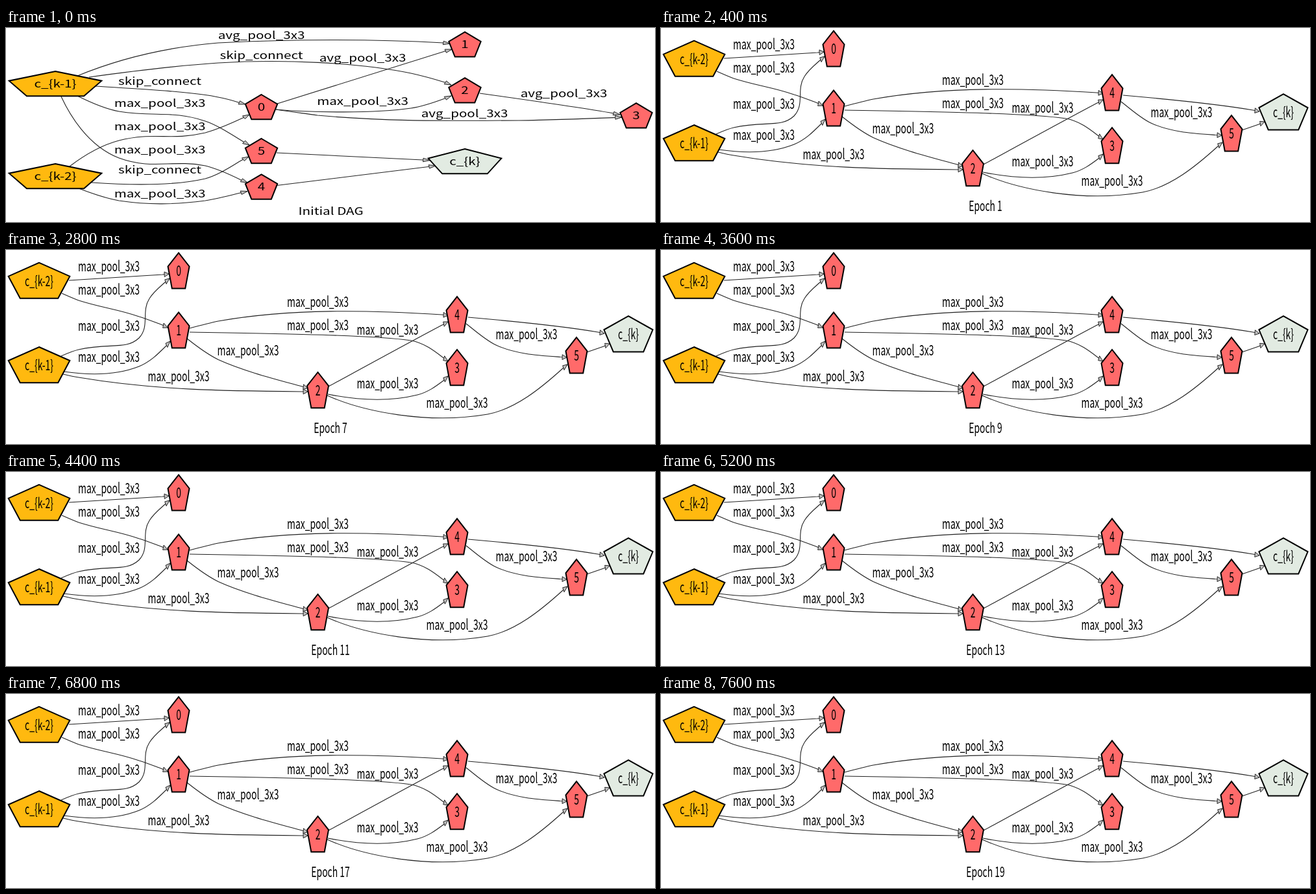
Write an HTML page that moves like this. It is 1000 px wide and 300 px high and loops after 8000 ms.

```html
<!DOCTYPE html>
<html lang="en">
<head>
<meta charset="utf-8">
<title>Cell search</title>
<style>
  html, body { margin: 0; width: 100%; height: 100%; overflow: hidden; background: #fff; }
  svg { display: block; width: 1000px; height: 300px; }
  text { font: 20px "Noto Sans CJK JP", "Noto Sans CJK SC", "Noto Sans CJK", sans-serif; text-anchor: middle; }
  .edge { fill: none; stroke: #222; stroke-width: 1.1; }
  .head { fill: #c0c0c0; stroke: #222; }
  .node { stroke: #000; stroke-width: 2; }
</style>
</head>
<body>
<svg id="stage" viewBox="0 0 1000 300"></svg>
<script>
const STEP = 400, STEPS = 20;
const GOLD = '#ffb90f', RED = '#ff6a6a', PALE = '#e2ebe2';
const MAX = 'max_pool_3x3', AVG = 'avg_pool_3x3', SKIP = 'skip_connect';

// Each graph is squeezed into the stage, so text and arrows share its x and y scale.
function graph({ sx, sy, radius, nodeBase, labelBase }) {
  const edges = [], nodes = [];
  const text = (s, x, y, id = '') =>
    `<text ${id} transform="translate(${x} ${y}) scale(${sx} ${sy})">${s}</text>`;

  function arrow(px, py, x, y) {
    const dx = (x - px) / sx, dy = (y - py) / sy, len = Math.hypot(dx, dy);
    const ux = dx / len, uy = dy / len;
    const corner = side =>
      `${x - (10 * ux + side * uy) * sx},${y - (10 * uy - side * ux) * sy}`;
    return `<polygon class="head" points="${x},${y} ${corner(3.5)} ${corner(-3.5)}"/>`;
  }

  return {
    text,
    // The path ends with a straight piece that carries the arrowhead.
    edge(d, label, x, y) {
      const end = d.match(/[\d.]+/g).slice(-4).map(Number);
      edges.push(`<path class="edge" d="${d}"/>` + arrow(...end));
      if (label) edges.push(text(label, x, y + labelBase));
    },
    node(label, x, top, half, fill) {
      const rx = half / Math.sin(Math.PI * 0.4), cy = top + 1 + radius;
      const points = [0, 1, 2, 3, 4].map(i => {
        const a = i * Math.PI * 0.4;
        return `${x + rx * Math.sin(a)},${cy - radius * Math.cos(a)}`;
      });
      nodes.push(`<polygon class="node" fill="${fill}" points="${points.join(' ')}"/>` +
        text(label, x, top + nodeBase));
    },
    markup: caption => `<g>${edges.join('')}${nodes.join('')}${caption}</g>`
  };
}

function initialGraph() {
  const g = graph({ sx: 1.03, sy: 0.8, radius: 21.2, nodeBase: 26, labelBase: 5.7 });
  g.edge('M110 74C180 45 255 29 327 23C440 17 570 17 674 23L684 24', AVG, 393.5, 11);
  g.edge('M128 76C200 66 265 58 327 54C425 48 540 53 624 70C642 74 660 79 676 84L686 88', SKIP, 393.5, 42);
  g.edge('M138 90C200 94 280 98 322 106C338 109 346 111 358 115L369 118', SKIP, 237, 82);
  g.edge('M110 105C130 115 152 125 174 129C230 138 256 127 307 144C325 150 345 163 366 176L375 181', MAX, 237, 116);
  g.edge('M85 106C97 132 125 182 174 201C226 220 256 203 307 213C327 218 344 226 362 235L372 239', MAX, 237, 188);
  g.edge('M98 214C115 201 144 182 174 174C230 160 252 175 307 162C329 156 348 147 365 139L375 134', MAX, 237, 152);
  g.edge('M132 239C190 243 260 244 307 233C328 227 345 215 364 204L374 199', SKIP, 237, 219);
  g.edge('M112 248C130 255 152 263 174 267C222 274 258 273 307 267C326 264 345 259 361 255L372 252.5', MAX, 237, 256);
  g.edge('M418 117L676 36L687 33', AVG, 549.5, 46);
  g.edge('M416 126C470 131 570 132 624 124C644 121 660 115 676 109L686 105', MAX, 549.5, 113);
  g.edge('M416 126C440 130 460 132 480 135C600 146 700 143 790 143C850 142 900 140 938 138.5L949 138', AVG, 706.5, 132);
  g.edge('M730 101C780 108 880 122 936 132L946 134', AVG, 859.5, 101);
  g.edge('M417 193L642 204L653 204.6');
  g.edge('M417 243.5L651 214.5L662 213');

  g.node('c_{k-1}', 76, 66, 71.3, GOLD);
  g.node('c_{k-2}', 76, 209, 71.3, GOLD);
  g.node('0', 393.5, 102, 24.7, RED);
  g.node('5', 393.5, 170, 24.7, RED);
  g.node('4', 393.5, 225.3, 24.7, RED);
  g.node('1', 707, 5.2, 24.7, RED);
  g.node('2', 707, 76.2, 24.7, RED);
  g.node('3', 971, 115.2, 24.7, RED);
  g.node('c_{k}', 707, 186, 56.3, PALE);
  return g.markup(g.text('Initial DAG', 500.5, 288.5));
}

function epochGraph() {
  const g = graph({ sx: 0.695, sy: 1.1, radius: 30.5, nodeBase: 37, labelBase: 8.2 });
  g.edge('M97 47L241 38L251 37', MAX, 158.5, 25);
  g.edge('M86 67C95 71 104 75 112 78C150 90 170 91 205 103C218 107 230 112 241 116L249 120', MAX, 158.5, 61);
  g.edge('M85 164C94 160 103 156 112 154C160 143 185 155 205 136C222 118 208 95 221 75C228 64 236 58 245 50L252 44', MAX, 158.5, 117);
  g.edge('M89 188C130 194 170 194 205 180C222 173 234 161 246 149L253 141', MAX, 158.5, 165);
  g.edge('M88 192C96 194 104 196 112 197C230 217 340 218 455 219L465 219', MAX, 266, 195);
  g.edge('M283 121C298 117 313 113 327 110C440 90 560 93 671 100L681 101', MAX, 480.5, 80);
  g.edge('M283 127C400 129 560 131 624 140C645 144 660 156 673 166L681 172', MAX, 480.5, 116);
  g.edge('M279 137C294 149 310 161 327 169.5C365 187 416 200 456 211L465 213.5', MAX, 373, 155);
  g.edge('M497 211C541 187 632 137 673 115.5L681 111', MAX, 588, 123);
  g.edge('M496 223C540 232 590 235 634 224C650 220 662 211 674 202L681 195', MAX, 588, 206);
  g.edge('M495 225C550 250 650 270 742 254C785 246 825 213 858 183L865 177', MAX, 695, 236);
  g.edge('M712 104C780 110 860 118 912 127L922 129');
  g.edge('M709 114C727 128 740 140 755 147C785 161 820 163 854 165.5L864 166', MAX, 802, 130);
  g.edge('M895 158L921 149L930 145');

  g.node('c_{k-2}', 51, 18.6, 47.3, GOLD);
  g.node('c_{k-1}', 51, 149, 47.3, GOLD);
  g.node('0', 266, 3.4, 16.5, RED);
  g.node('1', 266, 95.4, 16.5, RED);
  g.node('2', 480.5, 188, 16.5, RED);
  g.node('4', 695, 71.2, 16.5, RED);
  g.node('3', 695, 153, 16.5, RED);
  g.node('5', 879, 134.2, 16.5, RED);
  g.node('c_{k}', 959, 101.2, 37.6, PALE);
  return g.markup(g.text('', 500, 283.3, 'id="epoch"'));
}

const stage = document.getElementById('stage');
stage.innerHTML = initialGraph() + epochGraph();
const [initial, trained] = stage.children;
const epoch = document.getElementById('epoch');
const start = performance.now();
let shown = -1;

function draw() {
  const step = Math.floor(Math.max(0, performance.now() - start) / STEP) % STEPS;
  if (step !== shown) {
    shown = step;
    initial.style.display = step ? 'none' : '';
    trained.style.display = step ? '' : 'none';
    epoch.textContent = 'Epoch ' + step;
  }
  requestAnimationFrame(draw);
}
draw();
</script>
</body>
</html>
```
